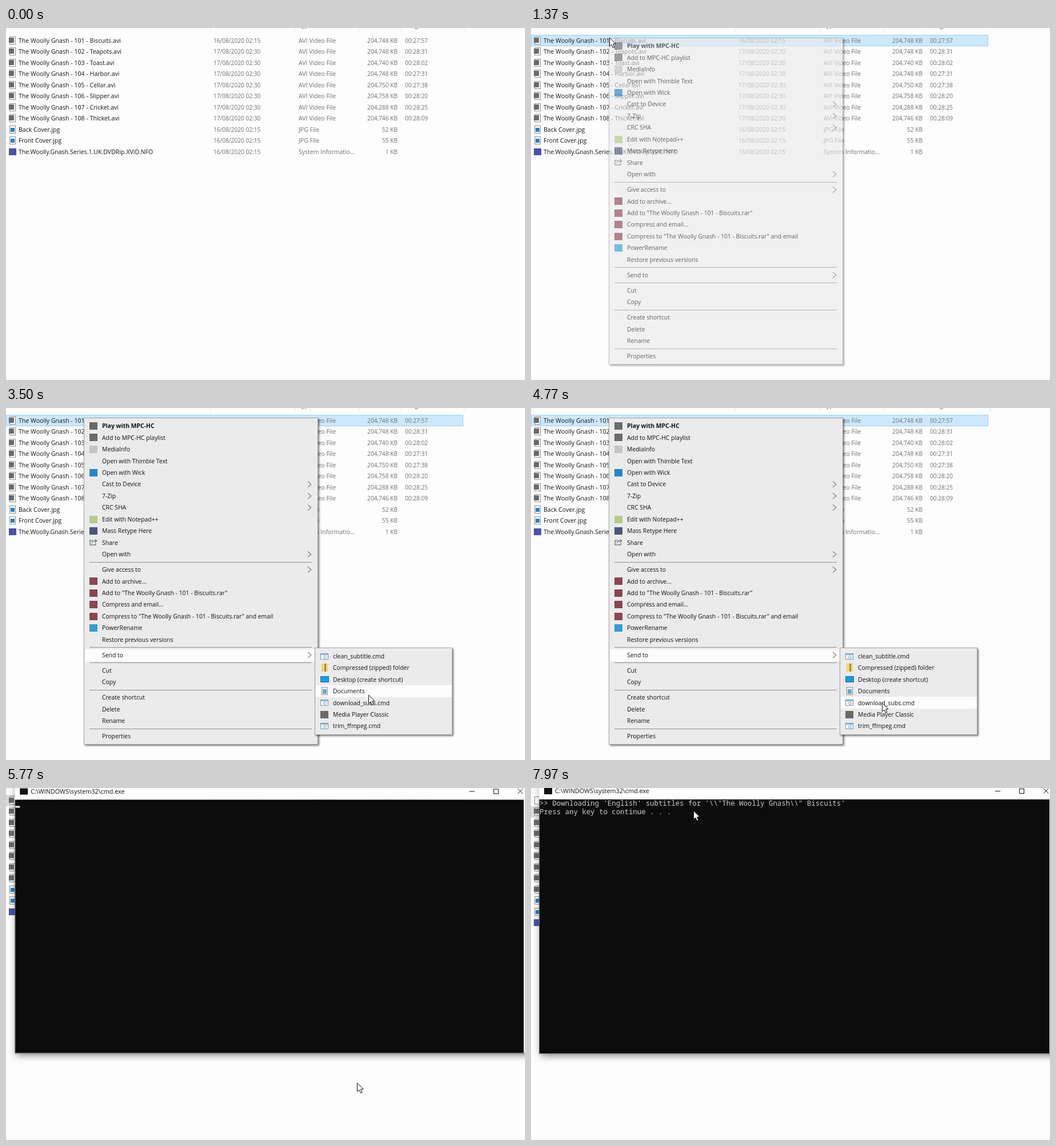
Animation of 908x617 px, one loop 8 s. Source, as an HTML page with a canvas:

```html
<!DOCTYPE html>
<html lang="en">
<head>
<meta charset="utf-8">
<title>Send to: download subtitles</title>
<style>
html, body { margin: 0; width: 100%; height: 100%; overflow: hidden; background: #fdfdfd; }
canvas { display: block; }
</style>
</head>
<body>
<canvas id="stage" width="908" height="617"></canvas>
<script>
const ctx = document.getElementById('stage').getContext('2d');
const LOOP = 8000, W = 908, H = 617;
const SANS = '"Open Sans", "Noto Sans", sans-serif';
const MONO = '"Noto Sans Mono", "DejaVu Sans Mono", monospace';
const SHOW = 'The Woolly Gnash', FIRST = 'Biscuits';

// Moments, in ms
const MENU = 1270, SUBMENU = 2600, CHOOSE = 5400, CONSOLE = 5520;
const LINE_1 = 5900, LINE_2 = 6700, NEW_FILE = 7170;

const episodes = [
  [FIRST, '204,748', '27:57'], ['Teapots', '204,748', '28:31'],
  ['Toast', '204,740', '28:02'], ['Harbor', '204,748', '27:31'],
  ['Cellar', '204,750', '27:38'], ['Slipper', '204,758', '28:20'],
  ['Cricket', '204,288', '28:25'], ['Thicket', '204,746', '28:09']
];
const files = [
  ...episodes.map(([title, size, length], i) => ({
    icon: 'video', name: `${SHOW} - ${101 + i} - ${title}.avi`, type: 'AVI Video File',
    date: i ? '17/08/2020 02:30' : '16/08/2020 02:15', size, length: '00:' + length
  })),
  { icon: 'picture', name: 'Back Cover.jpg', type: 'JPG File', size: '52' },
  { icon: 'picture', name: 'Front Cover.jpg', type: 'JPG File', size: '55' },
  { icon: 'info', name: SHOW.replaceAll(' ', '.') + '.Series.1.UK.DVDRip.XViD.NFO',
    type: 'System Informatio...', size: '1' }
];
const newFile = { icon: 'blank', name: `${SHOW} - 101 - ${FIRST}.srt`, type: 'SRT File', size: '38' };

// Items are [label, icon, has submenu]; null is a separator
const archive = '#8a4550', player = '#6a6a6a';
const menuItems = place(31.5, [
  ['Play with MPC-HC', player], ['Add to MPC-HC playlist', player], ['MediaInfo', '#c4c4c4'],
  ['Open with Thimble Text'], ['Open with Wick', '#2586cc'], ['Cast to Device', '', true],
  ['7-Zip', '', true], ['CRC SHA', '', true], ['Edit with Notepad++', '#b5c98a'],
  ['Mass Retype Here', '#4d5778'], ['Share', 'share'], ['Open with', '', true], null,
  ['Give access to', '', true], ['Add to archive...', archive],
  [`Add to "${SHOW} - 101 - ${FIRST}.rar"`, archive], ['Compress and email...', archive],
  [`Compress to "${SHOW} - 101 - ${FIRST}.rar" and email`, archive],
  ['PowerRename', '#369bd7'], ['Restore previous versions'], null,
  ['Send to', '', true], null, ['Cut'], ['Copy'], null,
  ['Create shortcut'], ['Delete'], ['Rename'], null, ['Properties']
]);
const subItems = place(435, [
  ['clean_subtitle.cmd', 'script'], ['Compressed (zipped) folder', 'zip'],
  ['Desktop (create shortcut)', 'desktop'], ['Documents', 'document'],
  ['download_subs.cmd', 'script'], ['Media Player Classic', player], ['trim_ffmpeg.cmd', 'script']
]);
const menuBox = { x: 136, y: 17, w: 410, h: 573 };
const subBox = { x: 540, y: 420, w: 241, h: 153 };

// Pointer path: [time, x, y]
const path = [
  [0, -16, 372], [700, 100, 70], [1050, 137, 17], [1500, 137, 17], [2180, 366, 428],
  [2650, 400, 430], [3100, 590, 437], [3500, 634, 503], [3950, 614, 517],
  [7170, 614, 517], [7950, 284, 40], [LOOP, 284, 40]
];

function place(y, items) {
  const placed = [];
  for (const item of items) {
    if (item) {
      const [label, icon, more] = item;
      placed.push({ label, icon, more, y });
      y += 20.45;
    } else {
      placed.push({ line: true, y: y - 7.2 });
      y += 6.5;
    }
  }
  return placed;
}

const clamp = v => Math.max(0, Math.min(1, v));
const progress = (t, start, length) => clamp((t - start) / length);

function pointerAt(t) {
  const i = path.findIndex(p => p[0] > t);
  const [t0, x0, y0] = path[i - 1], [t1, x1, y1] = path[i];
  const p = (t - t0) / (t1 - t0), e = p * p * (3 - 2 * p);
  return { x: x0 + (x1 - x0) * e, y: y0 + (y1 - y0) * e };
}

function rect(x, y, w, h, fill, stroke) {
  if (fill) { ctx.fillStyle = fill; ctx.fillRect(x, y, w, h); }
  if (stroke) { ctx.strokeStyle = stroke; ctx.lineWidth = 1; ctx.strokeRect(x + .5, y + .5, w - 1, h - 1); }
}

function line(points, color, width = 1) {
  ctx.strokeStyle = color;
  ctx.lineWidth = width;
  ctx.beginPath();
  points.forEach(([x, y]) => ctx.lineTo(x, y));
  ctx.stroke();
}

function text(string, x, y, size, color, { align = 'left', weight = 400, family = SANS } = {}) {
  ctx.font = `${weight} ${size}px ${family}`;
  ctx.textAlign = align;
  ctx.fillStyle = color;
  ctx.fillText(string, x, y + 3.7);
}

// The shadow stays outside the box, so a half-faded panel is not darkened by it
function panel({ x, y, w, h }, fill, border, blur, offset) {
  ctx.save();
  ctx.beginPath();
  ctx.rect(x - 40, y - 40, w + 80, h + 80);
  ctx.rect(x, y, w, h);
  ctx.clip('evenodd');
  ctx.shadowColor = 'rgba(0,0,0,.5)';
  ctx.shadowBlur = blur;
  ctx.shadowOffsetX = ctx.shadowOffsetY = offset;
  rect(x, y, w, h, '#000');
  ctx.restore();
  rect(x, y, w, h, fill, border);
}

const page = (x, y) => rect(x - 5, y - 7, 11, 14, '#fff', '#8c8c8c');
const icons = {
  blank: page,
  video(x, y) { page(x, y); rect(x - 6, y - 5, 9, 9, player); },
  picture(x, y) { page(x, y); rect(x - 3, y - 3, 7, 7, '#2382c8'); },
  info(x, y) { rect(x - 6, y - 6, 13, 12, '#4a52ad'); },
  document(x, y) { page(x, y); rect(x - 3, y - 3, 7, 8, '#62a9d6'); },
  desktop(x, y) { rect(x - 7, y - 5, 15, 11, '#169fe0', '#1674ad'); },
  zip(x, y) { rect(x - 5, y - 7, 11, 14, '#f3d573'); rect(x, y - 7, 3, 14, '#a48b45'); },
  script(x, y) {
    rect(x - 7, y - 5, 14, 11, '#f5f9fc', '#8094a8');
    rect(x - 6, y - 4, 12, 2, '#8cb9de');
    ctx.strokeStyle = '#6d9dc4';
    ctx.beginPath();
    ctx.arc(x + 1, y + 1.5, 2.3, 0, 7);
    ctx.stroke();
  },
  share(x, y) {
    line([[x - 2, y - 3], [x - 6, y - 3], [x - 6, y + 5], [x + 4, y + 5], [x + 4, y + 2]], '#444');
    line([[x - 3, y + 2], [x - 1, y - 2], [x + 5, y - 2]], '#444');
    line([[x + 2, y - 5], [x + 6, y - 2], [x + 2, y + 1]], '#444');
  }
};

function drawIcon(icon, x, y) {
  if (icon in icons) icons[icon](x, Math.floor(y));
  else if (icon) rect(x - 7, Math.floor(y) - 6, 14, 13, icon);
}

function drawFiles(t, pointer) {
  for (const x of [357, 505, 617, 691, 803]) rect(x, 0, 1, 6, '#e8e8e8');
  text('Type', 512, -5, 10.4, '#555');
  text('Length', 698, -5, 10.4, '#555');

  const added = t >= NEW_FILE;
  const rows = added ? [newFile, ...files] : files;
  const hovered = t < MENU && pointer.x > 0 ? Math.floor((pointer.y - 12) / 19.5) : -1;
  rows.forEach((file, i) => {
    const y = 22 + 19.5 * i;
    if (t >= MENU && i === +added) {
      if (t < CONSOLE) rect(0, 12, 800, 20, '#cce8ff', '#99d1ff');
      else rect(0, Math.round(y) - 10, 800, 20, '#d9d9d9');
    } else if (i === hovered) {
      rect(0, Math.round(y) - 10, 800, 20, '#e5f3ff');
    }
    drawIcon(file.icon, 11, y);
    text(file.name, 22, y, 10.6, '#161616');
    text(file.date || '16/08/2020 02:15', 363, y, 10.15, '#707070');
    text(file.type, 512, y, 10.5, '#707070');
    text(file.size + ' KB', 685, y, 10.2, '#707070', { align: 'right' });
    if (file.length) text(file.length, 698, y, 10.1, '#707070');
  });
}

function drawItem(item, box, selected) {
  const { x, w } = box, y = item.y;
  if (item.line) return rect(x + 10, Math.round(y), w - 21, 1, '#8f8f8f');
  if (selected) rect(x + 2, Math.round(y - 10.5), w - 3, 21, '#fdfdfd');
  drawIcon(item.icon, x + 17, y);
  text(item.label, x + 32, y, 10.4, '#111', { weight: item === menuItems[0] ? 700 : 400 });
  if (item.more) line([[x + 392, y - 5], [x + 398, y], [x + 392, y + 5]], '#444');
}

function drawMenu(items, box, opacity, isSelected) {
  ctx.globalAlpha = opacity;
  panel(box, '#ebebec', '#a3a3a6', 3, 2);
  for (const item of items) drawItem(item, box, isSelected(item));
  ctx.globalAlpha = 1;
}

function drawMenus(t, pointer) {
  if (t < MENU) return;
  if (t >= CHOOSE) {
    ctx.globalAlpha = 1 - progress(t, CHOOSE, 340);
    drawItem(subItems[4], subBox, true);
    ctx.globalAlpha = 1;
    return;
  }
  const subOpen = t >= SUBMENU;
  const inSub = subOpen && pointer.x > subBox.x;
  const under = item => Math.abs(pointer.y - item.y) < 10.23;
  drawMenu(menuItems, menuBox, progress(t, MENU, 160),
    item => subOpen && item.label === 'Send to' || !inSub && pointer.x > menuBox.x + 1 && under(item));
  if (subOpen) drawMenu(subItems, subBox, progress(t, SUBMENU, 160), item => inSub && under(item));
}

function drawConsole(t) {
  if (t < CONSOLE) return;
  const p = progress(t, CONSOLE, 330), scale = 1 - .05 * (1 - p) ** 2;
  ctx.save();
  ctx.globalAlpha = progress(t, CONSOLE, 165);
  ctx.translate(460, 210);
  ctx.scale(scale, scale);
  ctx.translate(-460, -210);

  panel({ x: 14, y: -11, w: 910, h: 477 }, null, '#777', 12, 3);
  rect(14, -11, 910, 31, '#fff');
  rect(907, 20, 17, 445, '#f0f0f0');
  rect(15, 20, 892, 445, '#0c0c0c');
  rect(23, 0, 14, 11, '#111');
  text('C:\\WINDOWS\\system32\\cmd.exe', 42, 5.5, 10.8, '#111');
  line([[812, 5.5], [821, 5.5]], '#111');
  rect(854, 1, 9, 9, null, '#111');
  line([[896.5, .5], [905.5, 9.5]], '#111');
  line([[905.5, .5], [896.5, 9.5]], '#111');
  line([[912, 32], [915.5, 28], [919, 32]], '#999');
  line([[912, 453], [915.5, 457], [919, 453]], '#999');

  const type = (string, y) => text(string, 15, y, 12.38, '#ccc', { family: MONO });
  if (t >= LINE_1) type(`>> Downloading 'English' subtitles for '\\\\"${SHOW}\\\\" ${FIRST}'`, 27.5);
  if (t >= LINE_2) type('Press any key to continue . . .', 42.5);
  if (Math.floor(t / 530) % 2 === 0) {
    rect(t >= LINE_2 ? 245 : 15, t >= LINE_1 ? 46 : 31, 8, 3, '#f2f2f2');
  }
  ctx.restore();
}

function drawPointer({ x, y }) {
  const outline = [[0, 0], [0, 15], [3.4, 12], [6, 17.6], [8.4, 16.5], [6, 11], [10.5, 10.6]];
  ctx.beginPath();
  outline.forEach(([dx, dy]) => ctx.lineTo(x + dx + .5, y + dy));
  ctx.closePath();
  ctx.fillStyle = '#fff';
  ctx.fill();
  ctx.strokeStyle = '#111';
  ctx.lineWidth = 1;
  ctx.stroke();
}

const start = performance.now();
function frame() {
  const t = (performance.now() - start) % LOOP;
  const pointer = pointerAt(t);
  rect(0, 0, W, H, '#fdfdfd');
  drawFiles(t, pointer);
  drawConsole(t);
  drawMenus(t, pointer);
  drawPointer(pointer);
  requestAnimationFrame(frame);
}
frame();
</script>
</body>
</html>
```
